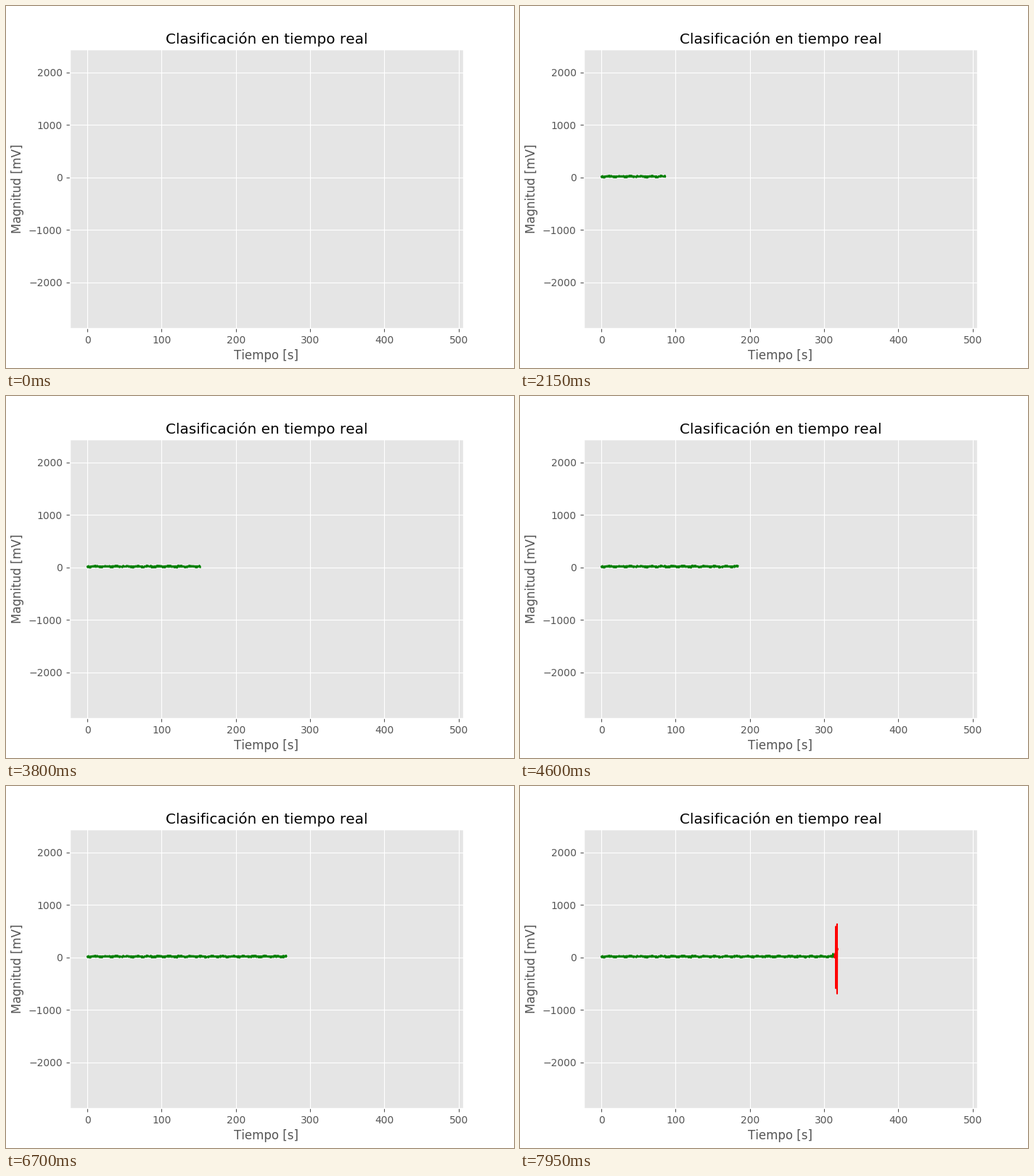
Write a matplotlib script that moves like this. It is 700 px wide and 500 px high and loops after 8000 ms.

```python
import numpy as np
import matplotlib.pyplot as plt
from matplotlib.animation import FuncAnimation

FRAMES = 160
STEP = 2          # seconds of signal added per frame
RATE = 10         # samples per second
ALARM = 314       # the signal is classified as abnormal from here on
END = FRAMES * STEP - STEP


def rest_signal():
    """Quiet baseline: slow ripple, spiky sensor noise, a bump before the alarm."""
    rng = np.random.default_rng(7)
    t = np.arange(ALARM * RATE + 1) / RATE
    ripple = 7 * np.cos(2 * np.pi * (t - 10.5) / 14.3)
    y = np.clip(20 + ripple + rng.laplace(0, 4, t.size), -6, 44)
    return t, y + 50 * np.exp(-((t - ALARM + 2) / 0.15) ** 2)


def burst_signal():
    """Strong contraction: a rising wobble broken by two sharp swings."""
    t = np.linspace(ALARM, END, 4 * RATE + 1)
    y = 150 * np.sin((t - ALARM) / 3) + 35 * np.sin(7 * (t - ALARM))
    for when, high, low in ((1.6, 590, -585), (3.4, 638, -688)):
        k = int(when * RATE)
        y[k:k + 2] = high, low
        t[k + 1] = t[k] + 0.05
    return t, y


plt.style.use("ggplot")
plt.rcParams["text.kerning_factor"] = 6
fig, ax = plt.subplots(figsize=(7, 5), dpi=100)
ax.set_title("Clasificación en tiempo real")
ax.set_xlabel("Tiempo [s]")
ax.set_ylabel("Magnitud [mV]")
ax.set_xlim(-24.1, 506.1)
ax.set_ylim(-2869, 2441)

traces = []
for color, signal in (("green", rest_signal()), ("red", burst_signal())):
    line, = ax.plot([], [], color=color, lw=1.5)
    traces.append((line, *signal))


def update(i):
    now = i * STEP
    for line, t, y in traces:
        seen = (t <= now) & (now > t[0])
        line.set_data(t[seen], y[seen])
    return [line for line, _, _ in traces]


anim = FuncAnimation(fig, update, frames=FRAMES, interval=50,
                     repeat=True, repeat_delay=0)
plt.show()
```
